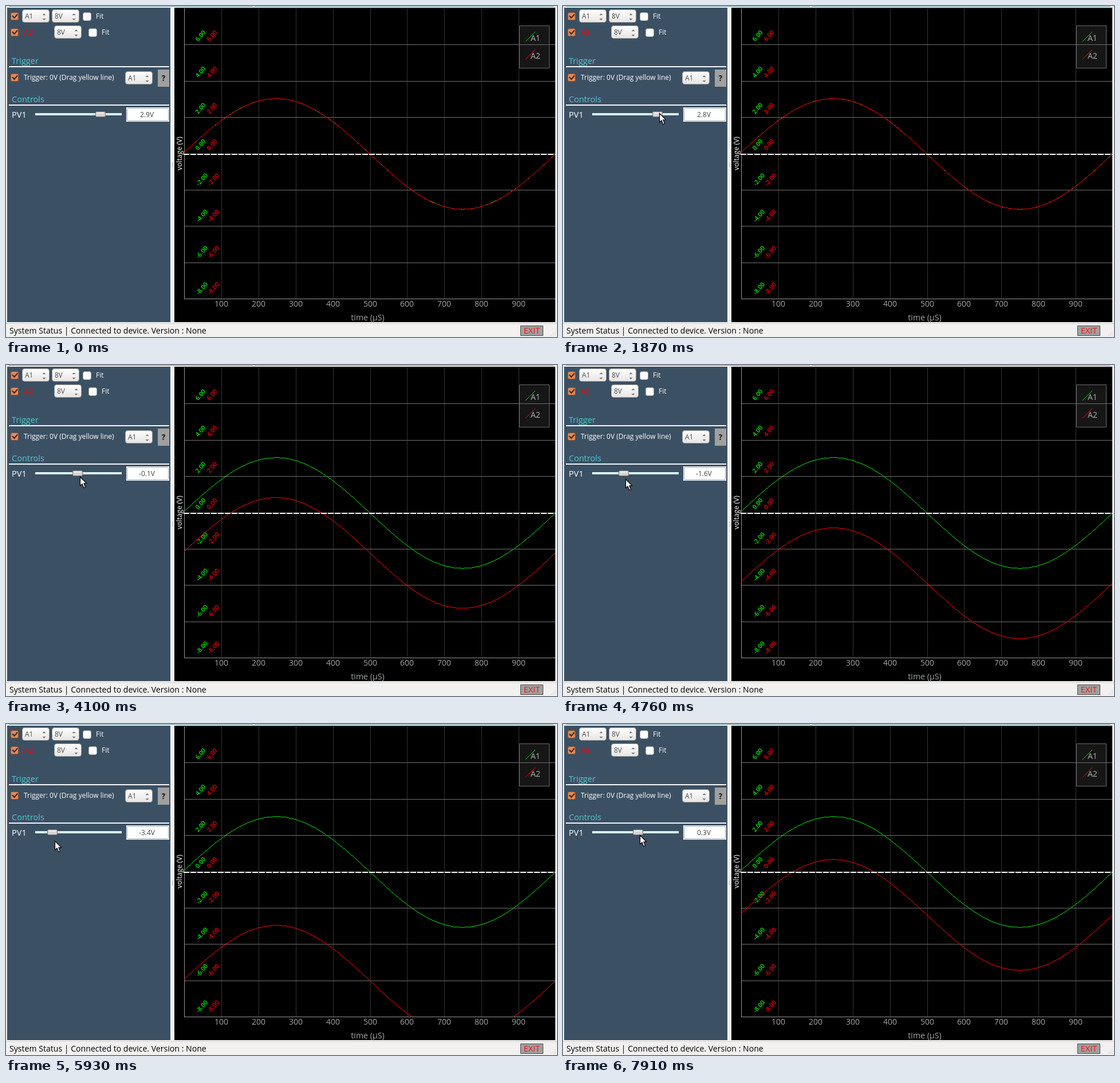
An HTML page with a canvas for the animation above (8000 ms loop, 962 by 578 pixels).

```html
<!DOCTYPE html>
<html lang="en">
<head>
<meta charset="utf-8">
<title>Oscilloscope</title>
<style>
  html, body { margin: 0; width: 100%; height: 100%; overflow: hidden; background: #f2f1f0; }
  canvas { display: block; }
</style>
</head>
<body>
<canvas id="stage" width="962" height="578"></canvas>
<script>
const ctx = document.getElementById('stage').getContext('2d');
const LOOP = 8000, REFRESH = 196, PHASE = 4760 % REFRESH, LAG = 90;
const LEFT = 311, WIDTH = 648, ZERO = 258.4, AMP = 96.8, BOTTOM = 511, PX_PER_VOLT = 31.7;

// The slider drag as [time, volts]
const drag = [[1650, 2.86], [2400, 2.8], [2870, 2.25], [3230, 1.8], [3600, 1.8], [3800, .3], [3920, .3],
  [4760, -1.57], [5700, -3.6], [5930, -3.42], [6380, -2.15], [6780, -1.72], [7910, .32]];

const clamp = u => Math.min(1, Math.max(0, u));
const mix = (a, b, u) => a + (b - a) * u;

function voltsAt(t) {
  const i = drag.findIndex(k => k[0] > t);
  if (i < 1) return i ? drag[drag.length - 1][1] : drag[0][1];
  const [t0, v0] = drag[i - 1], [t1, v1] = drag[i];
  return mix(v0, v1, (t - t0) / (t1 - t0));
}

const handleX = t => 126.7 + 13.3 * voltsAt(t);

function noise(n) {
  const s = Math.sin(n * 12.9898) * 43758.5453;
  return s - Math.floor(s) - .5;
}

function rect(x, y, w, h, fill) {
  ctx.fillStyle = fill;
  ctx.fillRect(x, y, w, h);
}

function box(x, y, w, h, radius, fill, stroke) {
  ctx.beginPath();
  ctx.roundRect(x + .5, y + .5, w - 1, h - 1, radius);
  ctx.fillStyle = fill;
  ctx.fill();
  ctx.strokeStyle = stroke;
  ctx.lineWidth = 1;
  ctx.stroke();
}

function line(points, color, width = 1) {
  ctx.beginPath();
  points.forEach(p => ctx.lineTo(...p));
  ctx.strokeStyle = color;
  ctx.lineWidth = width;
  ctx.stroke();
}

function polygon(points, fill) {
  ctx.beginPath();
  points.forEach(p => ctx.lineTo(...p));
  ctx.closePath();
  ctx.fillStyle = fill;
  ctx.fill();
}

function text(str, x, y, size, color, align = 'left', weight = '') {
  ctx.font = `${weight} ${size}px "Open Sans", sans-serif`;
  ctx.textAlign = align;
  ctx.fillStyle = color;
  ctx.fillText(str, x, y);
}

function tilted(str, x, y, angle, size, color, weight) {
  ctx.save();
  ctx.translate(x, y);
  ctx.rotate(angle);
  text(str, 0, size * .36, size, color, 'center', weight);
  ctx.restore();
}

function checked(y) {
  box(8, y, 14, 14, 2.5, '#e58a58', '#93512d');
  line([[11, y + 6], [14.5, y + 10], [20, y + 3.5]], '#3d2415', 2);
}

function combo(x, y, label) {
  const g = ctx.createLinearGradient(0, y, 0, y + 23);
  g.addColorStop(0, '#fff');
  g.addColorStop(1, '#e6e4e2');
  box(x, y, 48, 23, 4, g, '#9b9a98');
  text(label, x + 5, y + 15.5, 12, '#4c4c4c');
  const c = x + 38.5;
  polygon([[c - 3, y + 10], [c, y + 7], [c + 3, y + 10]], '#777');
  polygon([[c - 3, y + 16], [c, y + 19], [c + 3, y + 16]], '#777');
}

function fitOption(x, y) {
  box(x, y, 15, 15, 3, '#fff', '#a5a3a1');
  text('Fit', x + 23, y + 11, 12, '#fff');
}

function heading(str, y) {
  const g = ctx.createLinearGradient(10, 0, 66, 0);
  g.addColorStop(0, '#58c0e4');
  g.addColorStop(.5, '#4ccfc4');
  g.addColorStop(1, '#58c0e4');
  text(str, 10, y, 14.5, g);
  rect(5, y + 4, 280, 2, '#f4f6f7');
}

function panel(t) {
  rect(2, 3, 285, 549, '#3b5063');
  [11, 39, 118].forEach(checked);
  combo(28, 6, 'A1');
  combo(80, 6, '8V');
  combo(84, 34, '8V');
  combo(208, 114, 'A1');
  fitOption(134, 11);
  fitOption(144, 39);
  text('A2', 31, 51, 14, '#f00');
  heading('Trigger', 101);
  heading('Controls', 168);
  text('Trigger: 0V (Drag yellow line)', 31, 129, 12, '#fff');
  rect(265, 111, 20, 30, '#a0a0a0');
  text('?', 275, 131, 13.5, '#111', 'center', 'bold');

  text('PV1', 10, 195, 14.6, '#fff');
  rect(51, 187, 151, 4, '#d8f2f5');
  const x = Math.round(handleX(t)) - 9;
  box(x, 184, 18, 10, 2, '#d6d4d2', '#77736f');
  rect(x + 3, 186, 12, 2, '#eeedec');
  rect(210, 177, 75, 25, '#fff');
  box(211, 178, 73, 23, 2, '#fff', '#9ba4ac');
  text(voltsAt(t).toFixed(1) + 'V', 246, 194, 12, '#444', 'center');
}

// One-pixel trace through jittered samples, leading slightly in its first half
function wave(color, shift, seed) {
  const sample = k => {
    const u = k / 40, lead = .005 * clamp(1 - 2 * u);
    return noise(seed + k) * .2 - AMP * Math.sin((u + lead) * 2 * Math.PI);
  };
  const y = x => {
    const s = x / WIDTH * 40, i = Math.floor(s);
    return Math.floor(ZERO + shift + mix(sample(i), sample(i + 1), s - i));
  };
  for (let x = 0; x < WIDTH; x++) {
    const a = y(x), b = y(x + 1), top = b < a ? b + 1 : a;
    if (top < BOTTOM) rect(LEFT + x, top, 1, Math.max(1, Math.abs(b - a)), color);
  }
}

function legend(label, y, color) {
  line([[907, y + 1], [924, y - 16]], color);
  text(label, 916, y, 14, '#b0b0b0');
}

function plot(t) {
  rect(294, 3, 665, 549, '#000');
  for (let i = 1; i < 10; i++) {
    const x = Math.round(LEFT + .3 + 64.85 * i);
    rect(x, 4, 1, 507, '#343434');
    text(i * 100, x, 525, 14, '#a2a2a2', 'center');
  }
  for (let i = 1; i < 8; i++) rect(LEFT, Math.round(4 + 63.4 * i), WIDTH, 1, '#707070');
  rect(LEFT, 4, WIDTH, 1, '#333');
  rect(LEFT, 4, 1, 508, '#969696');
  rect(LEFT, BOTTOM, WIDTH, 1, '#969696');
  text('time (µS)', 631.5, 549, 14.2, '#a2a2a2', 'center');
  tilted('voltage (V)', 303, 257.5, -Math.PI / 2, 12.2, '#fff');

  for (let v = 6; v >= -8; v -= 2) {
    const x = v < 0 ? 342 : 339.5, y = (v < 0 ? 239.5 : 242) - v * PX_PER_VOLT;
    tilted(v.toFixed(2), x, y, -.86, 10.7, '#0e0', 600);
    tilted(v.toFixed(2), x + 20, y, -.86, 10.7, '#e80000', 600);
  }

  const step = Math.floor((t - PHASE) / REFRESH);
  const measured = voltsAt(step * REFRESH + PHASE - LAG);
  wave('#0d0', 0, step * 7.3);
  wave('#f00', Math.max(0, 2.5 - measured) * PX_PER_VOLT, step * 7.3 + 90);
  ctx.setLineDash([10, 2]);
  line([[LEFT - 1, 259], [959, 259]], '#fff', 2);
  ctx.setLineDash([]);

  box(896, 34, 53, 75, 0, 'rgba(100,100,100,.22)', '#6a6a6a');
  legend('A1', 61, '#0d0');
  legend('A2', 92, '#f00');
}

function windowFrame() {
  rect(0, 0, 962, 578, '#f2f1f0');
  rect(5, 0, 426, 1, '#5f93a3');
  rect(434, 0, 522, 1, '#5f93a3');
  for (let i = 0; i < 3; i++) rect(290, 274 + i * 3, 2, 1, '#a5a3a1');
  rect(0, 554, 962, 1, '#d2d0ce');
  text('System Status | Connected to device. Version : None', 6, 572, 14.1, '#000');
  box(898, 558, 40, 18, 0, '#a0a0a0', '#484848');
  text('EXIT', 918, 572, 14.6, '#f01515', 'center');
  for (let i = 0; i < 3; i++)
    for (let j = 0; j <= i; j++) rect(958 - j * 3, 568 + i * 3, 1, 1, '#b5b3b1');
}

function pointer(t) {
  if (t < 330) return;
  const arrive = 1 - (1 - clamp((t - 330) / 800)) ** 2;
  const x = mix(230, handleX(t) + 3.5, arrive);
  const y = mix(531, Math.max(187, 194.5 - 2.9 * voltsAt(t)), arrive);
  const arrow = [[0, 0], [0, 15.5], [3.5, 12.3], [6.3, 19], [9, 17.8], [6.3, 11.3], [11, 11]];
  ctx.save();
  ctx.translate(Math.round(x) + .5, Math.round(y) + .5);
  polygon(arrow, '#fff');
  line([...arrow, arrow[0], arrow[1]], '#000', 1.2);
  ctx.restore();
}

function draw() {
  const t = performance.now() % LOOP;
  windowFrame();
  panel(t);
  plot(t);
  pointer(t);
  requestAnimationFrame(draw);
}
requestAnimationFrame(draw);
</script>
</body>
</html>
```
